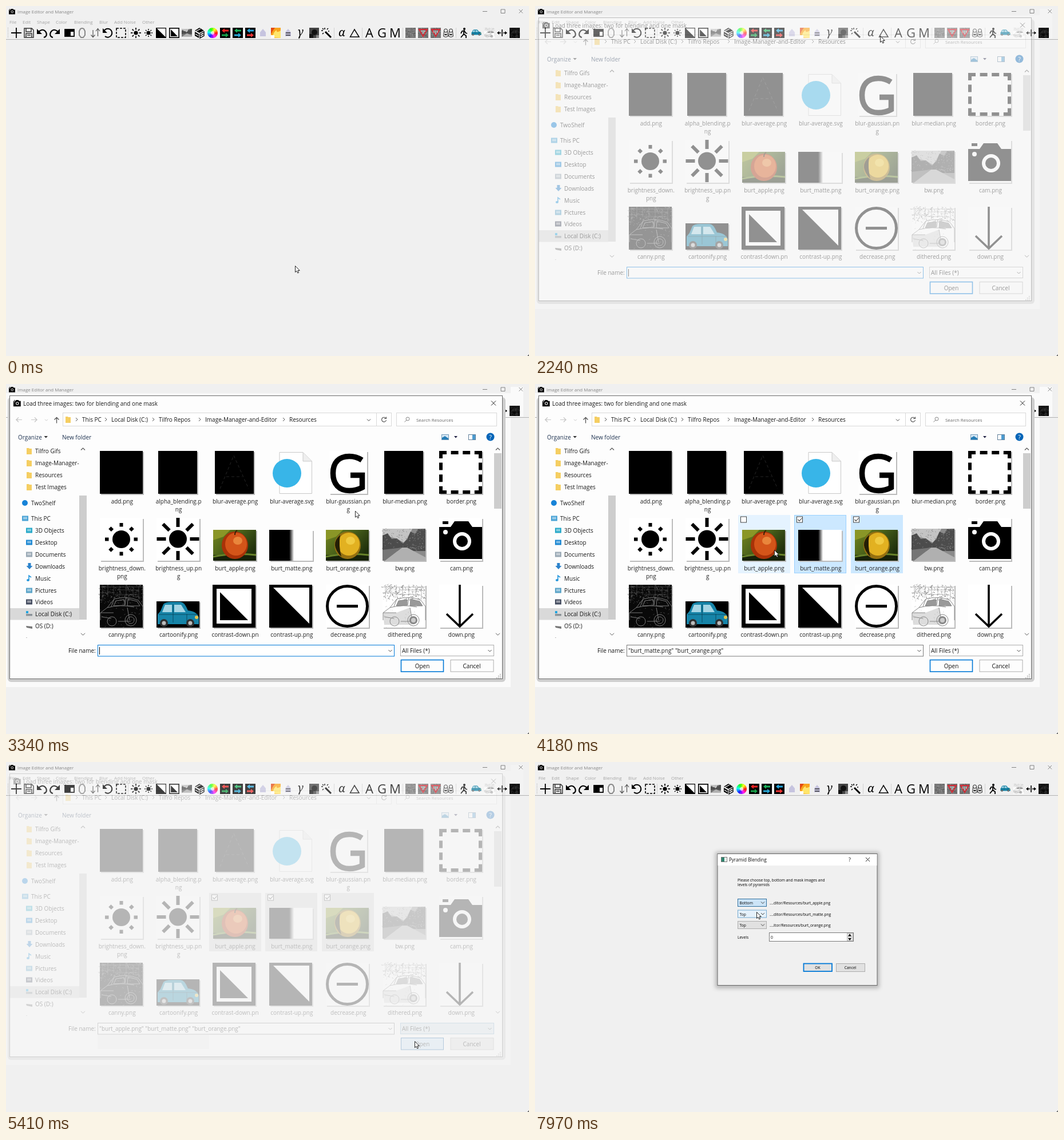
These frames come from a looping animation (914x612 px, 8 s). An HTML page:

```html
<!DOCTYPE html>
<html lang="en">
<head>
<meta charset="utf-8">
<title>Image Editor and Manager</title>
<style>
html, body { margin: 0; width: 100%; height: 100%; overflow: hidden; background: #f0f0f0; }
svg { display: block; width: 914px; height: 612px; }
text { font-family: "Open Sans", "Noto Sans", sans-serif; white-space: pre; }
</style>
</head>
<body>
<svg id="stage" viewBox="0 0 914 612"></svg>
<script>
const LOOP = 8000;
const range = (n, f) => Array.from({ length: n }, (_, i) => f(i)).join('');
const rect = (x, y, w, h, fill = '#000', stroke = 'none', sw = 1) =>
  `<rect x="${x}" y="${y}" width="${w}" height="${h}" fill="${fill}" stroke="${stroke}" stroke-width="${sw}"/>`;
const line = (d, stroke = '#000', sw = 1, fill = 'none', more = '') =>
  `<path d="${d}" stroke="${stroke}" stroke-width="${sw}" fill="${fill}" ${more}/>`;
const shape = (d, fill = '#000') => `<path d="${d}" fill="${fill}"/>`;
const disc = (x, y, r, fill = '#000', stroke = 'none', sw = 1) =>
  `<circle cx="${x}" cy="${y}" r="${r}" fill="${fill}" stroke="${stroke}" stroke-width="${sw}"/>`;
const oval = (x, y, rx, ry, fill, stroke = 'none') =>
  `<ellipse cx="${x}" cy="${y}" rx="${rx}" ry="${ry}" fill="${fill}" stroke="${stroke}"/>`;
const text = (x, y, s, size = 10, fill = '#1a1a1a', anchor = 'start') =>
  `<text x="${x}" y="${y}" font-size="${size}" fill="${fill}" text-anchor="${anchor}">${s}</text>`;
const at = (x, y, s, k = 1) => `<g transform="translate(${x} ${y}) scale(${k})">${s}</g>`;
const chevron = (x, y, c = '#444', r = 3) => line(`M${x - r} ${y - r / 2}l${r} ${r}l${r} ${-r}`, c);

let seed = 7;
const rnd = () => (seed = seed * 16807 % 2147483647) / 2147483647;
const scratches = (n, w, h, color, sw = .6) => line(range(n, () =>
  `M${rnd() * w} ${rnd() * h}l${rnd() * 6 - 3} ${rnd() * 4 - 2}`), color, sw);
const grain = (n, size, color) => range(n, () => rect(rnd() * (size - 1), rnd() * (size - 1), 1, 1, color));

// Shared pictures, drawn from their top left corner
const sun = (r, from, to, w) => disc(0, 0, r) + range(8, i =>
  `<g transform="rotate(${i * 45})">${rect(-w / 2, -to, w, to - from)}</g>`);
const camera = rect(6, 0, 10, 5) + shape('M0 10H20L27 0H51L58 10H75V66H0Z') +
  disc(40, 35, 13, 'none', '#fff', 6) + disc(11, 19, 4, '#fff');
const contrastUp = rect(0, 0, 75, 75) + shape('M7 5H70V68Z', '#fff');
const contrastDown = rect(0, 0, 75, 75) + rect(7, 7, 61, 61, '#fff') + shape('M13 13V62H62Z');
const road = rect(0, 0, 75, 56, '#8a8a8a') + shape('M0 0H52L45 16L37 24L24 17L0 11Z', '#c4c4c4') +
  shape('M0 12L9 8L16 18L25 17L36 26L43 18L49 5L57 9L62 1L75 0V39H0Z', '#4c4c4c') +
  scratches(130, 75, 38, '#898989', .8) + shape('M34 33H43L75 50V56H4Z', '#b0b0b0') + shape('M0 37L34 33L4 56H0Z', '#757575');
const outlineCar = c => line('M1 62V49L13 40L25 25Q46 19 67 27L75 38V62M13 40Q36 34 60 39M25 25L20 38M46 22L44 36M1 49H24M32 64H54M48 40L52 62M3 56L20 59M28 28L43 26V36L24 37ZM49 25L65 29L70 37H48Z', c, 1) +
  disc(21, 64, 8, 'none', c) + disc(54, 62, 10, 'none', c) + disc(54, 62, 6, 'none', c);
const street = c => line('M0 4H75M0 14H26M5 0V24M14 0V21M24 0V18M35 4V20M46 0V18M58 3V22M68 0V26M30 9H68M26 17H64', c, .8);
const edges = rect(0, 0, 75, 75, '#090909') + street('#444') + scratches(140, 75, 32, '#777') + outlineCar('#777') + scratches(70, 75, 75, '#666');
const sketch = rect(0, 0, 75, 75, '#fff') + street('#aaa') + scratches(170, 75, 27, '#777', .8) +
  shape('M1 49L24 49L48 40L52 70H3Z', '#ddd') + shape('M28 28L43 26V36L24 37ZM49 25L65 29L70 37H48Z', '#999') +
  outlineCar('#888') + scratches(60, 75, 75, '#bbb') + disc(54, 62, 7, '#888') + disc(54, 62, 4, '#ccc');
const carBody = shape('M2 40V23L7 17L12 5Q16 1 25 1H42Q49 1 55 16Q70 17 74 28V40Z', '#1684a8') +
  shape('M10 19L15 6H27V19Z', '#a5d5e4') + shape('M31 19V6H43L51 19Z', '#a5d5e4') +
  line('M29 5V37M4 23H72M53 22V36', '#07465d', .9) + disc(13, 38, 7, '#303030') + disc(59, 38, 7, '#303030') +
  disc(13, 38, 3.5, '#bbb') + disc(59, 38, 3.5, '#bbb') + disc(70, 28, 3, '#e5c34b');
const fruit = (a, b, c) => rect(0, 0, 75, 54, 'url(#leaves)') + shape('M0 0H30L18 12L0 18Z', '#8a9627') +
  shape('M0 44H75V54H0Z', '#17220a') + line('M0 47Q35 40 75 44', '#68832a', 3) +
  oval(38, 27, 23, 24, a) + oval(40, 25, 19, 20, b) + oval(43, 19, 8, 7, c);
const apple = fruit('#a93208', '#d45519', '#e9863b') + line('M38 9Q38 3 42 1', '#392209', 2);
const orange = fruit('#967010', '#e2b121', '#f0cb42') + shape('M25 9Q6 25 27 47Q22 28 25 9Z', '#241f06');

// Main window
const menu = [[6, 'File'], [29, 'Edit'], [54, 'Shape'], [87, 'Color'], [119, 'Blending'], [163, 'Blur'], [189, 'Add Noise'], [238, 'Other']];
const wheel = range(36, i => {
  const p = a => `${9 * Math.cos(a)} ${9 * Math.sin(a)}`, a = i * Math.PI / 18;
  return shape(`M0 0L${p(a)}A9 9 0 0 1 ${p(a + .2)}Z`, `hsl(${-i * 10} 100% 52%)`);
}) + disc(0, 0, 3, '#ffffffb0');
const swap = (left, right) => rect(-9, -9, 18, 18) + shape('M-6 -4L-1 -8V-5.5H6V-2.5H-1V0Z', left) + shape('M6 4L1 0V2.5H-6V5.5H1V8Z', right);
const bottle = shape('M-5 6V-1L0 -7L5 -1V6Z', '#c6c4df');
const noisy = (color, more = '') => rect(-9, -9, 18, 18, color) + at(-9, -9, grain(45, 18, '#999') + grain(45, 18, '#555')) + more;
const redTri = line('M-7 -6H7L0 6Z', '#d52a35', 2);
const glyph = (s, size = 22) => text(0, 8, s, size, '#000', 'middle');
const turn = line('M-7 -3A7.5 7.5 0 1 1 -5 6', '#000', 2) + shape('M-9 -8V0H-1Z');
const back = line('M-6 -2Q2 -9 7 -1Q10 6 3 8', '#000', 2.2) + shape('M-9 -7V2H0Z');
const shaker = x => line(`M${x - 3} -3L${x - 4} 6Q${x} 9 ${x + 4} 6L${x + 3} -3Z`, '#333', 1, '#ddd') + oval(x, -4, 3, 3, '#eee', '#222') + line(`M${x - 2} 3H${x + 2}`, '#222', 2);
const icons = [
  [18, line('M-9 0H9M0 -9V9', '#000', 1.8)],
  [40, line('M-8 -8H5L8 -5V8H-8ZM-5 -8V-2H4V-8M-5 8V1H5V8M-3 4H3', '#333', 1.5)],
  [63, back], [85, `<g transform="scale(-1 1)">${back}</g>`],
  [111, rect(-8, -6, 16, 12, '#fff', '#000', 1.8) + rect(-8, -6, 16, 4) + rect(-8, -2, 10, 8)],
  [133, line('M-3 -7Q0 -9 3 -7L5 -3V4L2 8H-2L-5 4V-3Z', '#888', 2)],
  [156, line('M-4 -5V7M-7.5 3.5L-4 7.5L-.5 3.5M4.5 6V-7M1 -3L4.5 -7.5L8 -3', '#555', 1.2)],
  [178, turn],
  [201, line('M-8 -8H8V8H-8Z', '#000', 1.6, 'none', 'stroke-dasharray="4 2"')],
  [227, sun(3.6, 5.5, 9, 1.7)], [249, sun(3.6, 5, 7, 1.5)],
  [271, at(-9, -9, contrastUp, .24)], [294, at(-9, -9, contrastDown, .24)],
  [316, at(-9, -7, road, .24)],
  [338, shape('M-8 -4L0 -9L8 -4L0 0ZM-8 -2L-1 2V9L-8 5Z') + line('M1 2L8 -2V5L1 9ZM-4 -4L3 -7M2 5L7 2', '#000', 1.4) + line('M-6 -3L2 -7M-7 2L-2 5', '#fff', 1.2)],
  [361, wheel], [383, swap('#e22', '#19a34a')], [405, swap('#1ab45c', '#28a8d8')], [427, swap('#25a7df', '#e33')],
  [449, bottle],
  [471, rect(-8, -9, 17, 18, '#f8a31c') + shape('M-8 -9H-1Q-6 -3 -8 3Z', '#e34a13') + shape('M-5 8Q-4 -2 2 -5Q1 1 9 -4V9Z', '#ffe66b') + rect(-8, 4, 6, 5, '#fff')],
  [493, bottle + line('M-4 0H4M-4 4H4', '#333', 1.5)],
  [515, glyph('<tspan font-family="Noto Serif, serif" font-style="italic" dy="-3">γ</tspan>', 19)],
  [538, rect(-8, -9, 17, 18, '#444') + disc(1, -1, 5, '#111') + rect(-8, 2, 7, 7, '#151515') + rect(4, 4, 5, 5, '#888')],
  [560, line('M-2 -2L8 8', '#000', 3) + line('M-3 -9V-6M-9 -4H-6M-7 -8L-5 -6M3 -8L1 -6M-7 2L-5 0M3 -3H5', '#000', 1.5)],
  [587, glyph('<tspan font-family="Noto Serif, serif" font-style="italic" dy="-2">α</tspan>', 20)],
  [609, line('M-7.5 7L0 -6L8 7Z', '#000', 1.5)],
  [635, glyph('A')], [657, glyph('G')], [680, glyph('M')],
  [707, noisy('#777')], [729, noisy('#777', redTri + line('M-4 -3H4M-2 0H2', '#eee'))], [751, noisy('#777', redTri + line('M-3 -4V0M0 -4V3M3 -4V0', '#eee'))],
  [773, shaker(-4.5) + shaker(4.5)],
  [800, disc(1, -7, 2) + line('M0 -4L0 2L-5 8M0 2L4 5V9M-5 1L-3 -3L1 -4L3 0L6 1', '#000', 1.8)],
  [822, at(-9, -6, carBody, .24)],
  [845, at(-9, -9, sketch, .24)],
  [867, line('M0 -6V6M-8 0H-2M2 0H8', '#000', 1.6) + shape('M-9 0L-5 -3V3ZM9 0L5 -3V3Z')],
  [889, at(-9, -9, edges, .24)],
];
const mainWindow = at(5, 5, camera, .145) + text(20, 12.5, 'Image Editor and Manager', 7.95, '#858585') +
  line('M833 9.5H841M865 6H872V12.5H865ZM896.5 6L903 12.5M903 6L896.5 12.5', '#777', .9) +
  menu.map(([x, s]) => text(x, 30.5, s, 7.95, '#a3a3a3')).join('') +
  line('M3.5 38V56', '#aaa', 1, 'none', 'stroke-dasharray="1 1.5"') +
  line([213, 573, 622, 693, 786].map(x => `M${x}.5 38V56`).join(''), '#d2d2d2') +
  icons.map(([x, s]) => at(x, 47, s)).join('') + line('M0 58.5H914', '#b2b2b2') + shape('M914 609V612H911Z', '#666');

// File dialog
const column = c => 202.8 + 98.85 * c;
const rows = [112, 229, 346];
const files = [
  ['add.png', 'alpha_blending.p|ng', 'blur-average.png', 'blur-average.svg', 'blur-gaussian.pn|g', 'blur-median.png', 'border.png'],
  ['brightness_down.|png', 'brightness_up.pn|g', 'burt_apple.png', 'burt_matte.png', 'burt_orange.png', 'bw.png', 'cam.png'],
  ['canny.png', 'cartoonify.png', 'contrast-down.pn', 'contrast-up.png', 'decrease.png', 'dithered.png', 'down.png'],
];
const paper = (x, y, w, h, s) => rect(x + 2, y + 2, w, h, '#bbb') + rect(x, y, w, h, '#fff') + at(x, y, s);
const black = (x, w, s = '') => paper(x, 117, w, 75, rect(0, 0, w, 75) + s);
const thumbs = black(164, 75) + black(266, 68) +
  black(365, 68, line('M9 66L33 8L59 66M20 45H48', '#252525', 1, 'none', 'stroke-dasharray="5 4"')) +
  line('M478 119.5H519L534.5 135V191.5H478Z', '#c8c8c8', 1, '#fff') + line('M519 120V135H534', '#c8c8c8', 1, '#eee') + disc(491, 156, 25, '#38b5e8') +
  paper(565, 117, 66, 75, line('M57 16Q47 9.500 35 9.500C16 9.500 6.500 21 6.500 39C6.500 58 17 69.500 35 69.500Q47 69.500 57.500 64V42.500H37', '#000', 9.5)) + black(661, 68) +
  paper(757, 117, 75, 75, line('M0 3H75M0 72H75M3 0V75M72 0V75', '#000', 6, 'none', 'stroke-dasharray="13 7.6"')) +
  paper(164, 234, 75, 75, at(37.5, 37.5, sun(15.5, 22, 28.5, 6))) + paper(263, 234, 75, 75, at(37.5, 37, sun(15.5, 21, 37, 6))) +
  paper(362, 255, 75, 54, apple) +
  paper(460, 255, 76, 54, rect(0, 0, 76, 54, 'url(#matte)')) +
  paper(559, 255, 75, 54, orange) + paper(658, 253, 75, 56, road) +
  paper(757, 234, 75, 75, at(0, 6, camera, 1)) +
  paper(164, 351, 75, 75, edges) + paper(263, 380, 75, 46, rect(0, 0, 75, 46) + carBody) +
  paper(361, 351, 75, 75, contrastDown) + paper(460, 351, 75, 75, contrastUp) +
  paper(559, 351, 75, 75, disc(37.5, 37.5, 35, '#fff', '#000', 5) + rect(19, 35, 37, 5)) +
  paper(658, 351, 75, 75, sketch) +
  paper(757, 351, 75, 75, line('M36 0V73M13 51L36 73L59 51', '#000', 3.6));
const labels = files.map((names, r) => names.map((name, c) => name.split('|').map((s, i) =>
  text(column(c), rows[r] + 97 - (r > 1 ? 1 : 0) + i * 14, s, 10, '#222', 'middle')).join('')).join('')).join('');

const folder = (x, y) => shape(`M${x} ${y - 5}h4l1 1h4v10h-9Z`, '#f5ce62');
const side = [
  [51, 117, 'Tilfro Gifs'], [51, 138, 'Image-Manager-'], [51, 159, 'Resources'], [51, 180, 'Test Images'],
  [44, 208, 'TwoShelf', '#1683d8'], [44, 235, 'This PC', '#4aa3d6'], [51, 256, '3D Objects', '#28a9c9'], [51, 277, 'Desktop', '#1e88d2'],
  [51, 298, 'Documents', '#9aa9b5'], [51, 319, 'Downloads', '#2c83cc'], [51, 340, 'Music', '#2496dc'], [51, 361, 'Pictures', '#5ba4c8'],
  [51, 381, 'Videos', '#454d60'], [51, 402, 'Local Disk (C:)', '#8a9298'], [51, 423, 'OS (D:)', '#777'],
];
const sideIcon = (i, x, y, c) => i < 4 ? folder(36, y) : i === 4 ? disc(33, y, 5, c) :
  i === 9 ? shape(`M38.5 ${y - 6}h5v5h3l-5.5 6l-5.5 -6h3Z`, c) :
  i === 10 ? line(`M40 ${y + 3}V${y - 5}L44 ${y - 2}`, c, 1.6) + oval(38.5, y + 3, 2.5, 2, c) :
  i === 13 ? rect(35, y, 11, 3.5, c) + rect(35, y - 5, 4, 4, '#21a5e0') :
  i === 14 ? shape(`M35 ${y}L46 ${y + 1}V${y + 5}L36 ${y + 3}Z`, c) :
  rect(x - 16, y - 4.5, 11, 9, c) + rect(x - 14, y - 2.5, 7, 4, '#ffffff70');
const crumbs = [[133, 'This PC'], [184, 'Local Disk (C:)'], [267, 'Tilfro Repos'], [348, 'Image-Manager-and-Editor'], [495, 'Resources']];
const fileBase = `<rect x="3" y="23" width="870" height="498" rx="6" fill="#cecece"/>` +
  rect(6.5, 20.5, 861, 495, '#fdfdfd', '#6b6b6b') + at(13, 28, camera, .17) +
  text(30, 37.5, 'Load three images: two for blending and one mask', 9.95) + line('M848 29.5L856 37.5M856 29.5L848 37.5', '#222') +
  line('M28 62.5H18L22 58.5M18 62.5L22 66.5M44 62.5H54L50 58.5M54 62.5L50 66.5', '#c6c6c6', 1.2) + chevron(70.5, 63, '#ccc', 2.5) +
  line('M88.5 68.5V58.5M84.5 62.5L88.5 58.5L92.5 62.5', '#555', 1.3) +
  rect(99.5, 50.5, 574, 23, '#fff', '#d9d9d9') + line('M647.5 51V73', '#d9d9d9') + rect(682.5, 50.5, 175, 23, '#fff', '#d9d9d9') +
  folder(104, 62) + crumbs.map(([x, s]) => text(x, 66, s) + line(`M${x - 11} 59l3 3l-3 3`, '#555')).join('') +
  chevron(634, 63) + line('M663.5 59.5A4 4 0 1 0 664.5 63M664.5 57.5V60.5H661', '#555', 1.2) +
  disc(702, 61, 3, 'none', '#888') + line('M700 63L696.5 66.5', '#888') + text(717, 65.5, 'Search Resources', 7.9, '#666') +
  text(21, 97, 'Organize', 10, '#1e3250') + shape('M66.5 91H73L69.75 94.5Z', '#333') + text(98, 97, 'New folder', 10, '#1e3250') +
  rect(761.5, 88.5, 12, 9, '#d9e9f5', '#7199b8') + shape('M762 97V94L767 91L773 95V97Z', '#267db6') + shape('M783 91H789L786 94.5Z', '#224') +
  rect(808.5, 88.5, 12, 9, '#fff', '#607f99') + rect(815, 89, 5, 8, '#4d9bd0') + disc(846.5, 92.5, 7, '#0565b8') + text(846.5, 96.5, '?', 11, '#fff', 'middle') +
  rect(7, 392, 121, 20.5, '#d9d9d9') + rect(128, 195, 13, 217, '#cdcdcd') +
  side.map(([x, y, s, c], i) => sideIcon(i, x, y, c) + text(x, y + 4, s)).join('') +
  rect(127.5, 130, 13, 16, '#fdfdfd') + line('M131 115.5L134.5 112L138 115.5M856 115.5L859.5 112L863 115.5', '#555', 1.2) +
  chevron(134.5, 437.5, '#555', 3.5) + chevron(859.5, 437.5, '#555', 3.5) + rect(35, 443, 2, 1, '#bbb') + rect(853, 121, 13, 97, '#cdcdcd');
const fileFront = thumbs + labels + text(109, 470, 'File name:') +
  range(3, i => range(i + 1, j => rect(863 - j * 3, 507 + i * 3, 1.5, 1.5, '#999')));

// Pyramid dialog
const small = (x, y, s, fill = '#000', anchor = 'start') => text(x, y, s, 6.7, fill, anchor);
const pyramidBase = `<rect x="315" y="157" width="287" height="239" rx="4" fill="#777" opacity=".45" filter="url(#soft)"/>` +
  rect(319, 160.5, 279, 230, '#f0f0f0', '#666') + rect(319.5, 161, 278, 20, '#fff') +
  rect(325.5, 166.5, 10, 8, '#fff', '#777') + rect(326, 167, 5, 7, '#30856f') +
  text(339, 174, 'Pyramid Blending', 8.02, '#111') + text(550, 174, '?', 9, '#111', 'middle') + line('M578 167L585 174M585 167L578 174', '#222') +
  small(354, 209, 'Please choose top, bottom and mask images and') + small(354, 217, 'levels of pyramids') +
  ['ditor/Resources/burt_apple', 'ditor/Resources/burt_matte', 'itor/Resources/burt_orange'].map((s, i) => small(410, 249 + i * 19.5, `....${s}.png`)).join('') +
  small(354, 309, 'Levels') + rect(409.5, 298.5, 147, 15, '#fff', '#7a7a7a') + small(412, 309, '0') +
  rect(545.5, 299.5, 10, 13, '#e8e8e8', '#bbb') + line('M545 306H556', '#bbb') + shape('M547 304.5H553L550 300.5ZM547 308H553L550 312Z') +
  rect(469.5, 352.5, 49.5, 13.5, '#e1e1e1', '#0078d7', 1.8) + small(494, 362, 'OK', '#000', 'middle') +
  rect(526.5, 352.5, 50, 14, '#e1e1e1', '#adadad') + small(551, 362, 'Cancel', '#000', 'middle');

document.getElementById('stage').innerHTML = `<defs>
  <linearGradient id="matte"><stop offset=".46"/><stop offset=".57" stop-color="#fff"/></linearGradient>
  <linearGradient id="leaves" x2="1" y2=".6"><stop stop-color="#74851f"/><stop offset=".5" stop-color="#48601a"/><stop offset="1" stop-color="#1f2f0c"/></linearGradient>
  <filter id="soft"><feGaussianBlur stdDeviation="3.5"/></filter></defs>` +
  rect(0, 0, 914, 612, '#f0f0f0') +
  `<path id="veil" d="M0 16H882V5H904V57H882V530H0Z" fill="#fafafa"/><g id="toolHover"></g>${mainWindow}
  <g id="fileDialog">${fileBase}<g id="cells"></g>${fileFront}<g id="fields"></g></g>
  <g id="pyramid">${pyramidBase}<g id="combos"></g></g>
  <g id="cursor">${line('M.5 .5V11.5L3 9.2L4.8 13L6.6 12.2L5 8.5H8.3Z', '#111', .9, '#fff')}</g>
  <circle id="ring" r="7" fill="none" stroke="#222"/>`;
const el = id => document.getElementById(id);
const put = (id, html) => { const n = el(id); if (n.last !== html) n.innerHTML = n.last = html; };

// Each move: start, interval, steps, bend point, end point
const moves = [
  [250, 120, 7, 220, 310, 620, 160], [1090, 120, 6, 705, 10, 603, 52],
  [2850, 120, 7, 625, 170, 599, 290], [3700, 120, 4, 550, 300, 502, 292],
  [4180, 120, 1, 418, 290, 418, 290], [4300, 120, 2, 410, 290, 403, 290],
  [4660, 120, 6, 690, 440, 714, 488], [5860, 120, 2, 712, 490, 711, 491],
  [6130, 120, 3, 442, 430, 420, 284], [6520, 120, 3, 400, 262, 392, 250],
  [6910, 120, 1, 390, 248, 390, 248], [7450, 127, 4, 389, 255, 387, 262],
];
function pointer(t) {
  let x = 505, y = 454;
  for (const [start, gap, n, bx, by, ex, ey] of moves) {
    if (t < start) break;
    const u = Math.min(n, Math.floor((t - start) / gap) + 1) / n, v = 1 - u;
    x = v * v * x + 2 * u * v * bx + u * u * ex;
    y = v * v * y + 2 * u * v * by + u * u * ey;
  }
  return [x, y];
}
const clicks = [[1970, 2090], [3570, 3700], [4060, 4180], [4540, 4660], [5260, 5410], [6910, 7060], [7830, 7970]];
const picks = [[4540, 2, 'burt_apple.png'], [4060, 3, 'burt_matte.png'], [3570, 4, 'burt_orange.png']];

function fileCells(t, x, y, picked) {
  return rows.map((top, r) => range(7, c => {
    const left = Math.round(column(c) - 45) - .5;
    const on = r === 1 && picked.some(p => p[1] === c);
    const over = x > left && x < left + 91 && y > top && y < top + 102;
    if (!on && !over) return '';
    const fill = !on ? '#e5f3ff' : t >= 5260 ? '#d9d9d9' : '#cce8ff';
    const focus = on && t < 5260 && picked[0][1] === c;
    return rect(left, top + .5, 90, 101, fill, focus ? '#99d1ff' : fill) + rect(left + 4, top + 3, 10, 10, '#fff', '#444') +
      (on ? line(`M${left + 6} ${top + 8}l2.5 2.5l4.5 -5`, '#333', 1.1) : '');
  })).join('');
}
function fileFields(t, picked) {
  const names = picked.map(p => p[2]);
  const value = names.length > 1 ? names.map(s => `"${s}"`).join(' ') : names.join('');
  const late = t >= 5020, press = t >= 5260;
  return (t >= 4660 ? rect(160, 477, 195, 25, '#f0f0f0') : '') +
    rect(160.5, 456.5, 518, 19.5, '#fff', picked.length ? '#7a7a7a' : '#0078d7') + text(163, 470, value, 9.9) +
    (picked.length ? '' : line('M163.5 460V473', '#000')) + chevron(671.5, 466.5) +
    rect(689.5, 456.5, 163, 19, late ? '#dbe7ef' : '#fff', late ? '#7fa9c8' : '#adadad') + text(692, 470, 'All Files (*)') + chevron(845.5, 466.5) +
    rect(690.5, 482.5, 74, 20.5, press ? '#cce4f7' : '#fdfdfd', press ? '#005499' : '#0078d7', press ? 1 : 1.6) + text(727.5, 497, 'Open', 10, '#111', 'middle') +
    rect(777, 482.5, 75, 20.5, late ? '#e1e1e1' : '#fdfdfd', '#adadad') + text(814, 497, 'Cancel', 10, '#111', 'middle');
}
function comboBoxes(t, x, y) {
  const done = t >= 7970, open = t >= 7060 && !done;
  const boxes = range(3, i => {
    const top = 239.5 + i * 19.5;
    const over = !open && x > 354 && x < 405 && y > top && y < top + 14;
    const focus = i === 0 && t >= 6910;
    return rect(354.5, top, 50, 13, focus ? '#cce4f7' : over ? '#e5f1fb' : '#e1e1e1', focus ? '#2f6f9f' : over ? '#72a9d0' : '#adadad') +
      small(357.5, top + 9.5, i === 0 && done ? 'Bottom' : 'Top') + chevron(398, top + 6.5);
  });
  if (!open) return boxes;
  const active = y > 253 ? 1 : 0;
  return boxes + rect(355.5, 239.5, 50, 39.5, '#fff', '#777') + ['Top', 'Bottom', 'Mask'].map((s, i) =>
    (i === active ? rect(356, 240 + i * 13, 49, 13, '#0078d7') : '') + small(358.5, 249 + i * 13, s, i === active ? '#fff' : '#000')).join('');
}
function toolHover(t, x, y) {
  const spot = t < 2240 && y > 36 && y < 58 && [609, 635, 657, 680].find(c => Math.abs(x - c) < 11.5);
  return spot ? rect(spot - 10.5, 36.5, 21, 21, t >= 1970 ? '#bcdcf4' : '#d3e6f5') : '';
}
const dialogOpacity = t => t < 2240 ? 0 : t < 2360 ? .4 : t < 2480 ? .85 : t < 5410 ? 1 : t < 5560 ? .25 : 0;

function draw(now) {
  const t = now % LOOP, [x, y] = pointer(t), shown = dialogOpacity(t);
  const picked = picks.filter(p => t >= p[0]);
  el('veil').setAttribute('opacity', t < 2090 ? 0 : shown || (t < 2240 ? .4 : 0));
  put('toolHover', toolHover(t, x, y));
  el('fileDialog').setAttribute('opacity', shown);
  if (shown) {
    put('cells', fileCells(t, x, y, picked));
    put('fields', fileFields(t, picked));
  }
  el('pyramid').setAttribute('visibility', t >= 5710 ? 'visible' : 'hidden');
  put('combos', comboBoxes(t, x, y));
  el('cursor').setAttribute('transform', `translate(${x} ${y})`);
  const ring = el('ring');
  ring.setAttribute('cx', x + 1);
  ring.setAttribute('cy', y + 3);
  ring.setAttribute('visibility', clicks.some(([a, b]) => t >= a && t < b) ? 'visible' : 'hidden');
  requestAnimationFrame(() => draw(performance.now() - begin));
}
const begin = performance.now();
draw(0);
</script>
</body>
</html>
```
